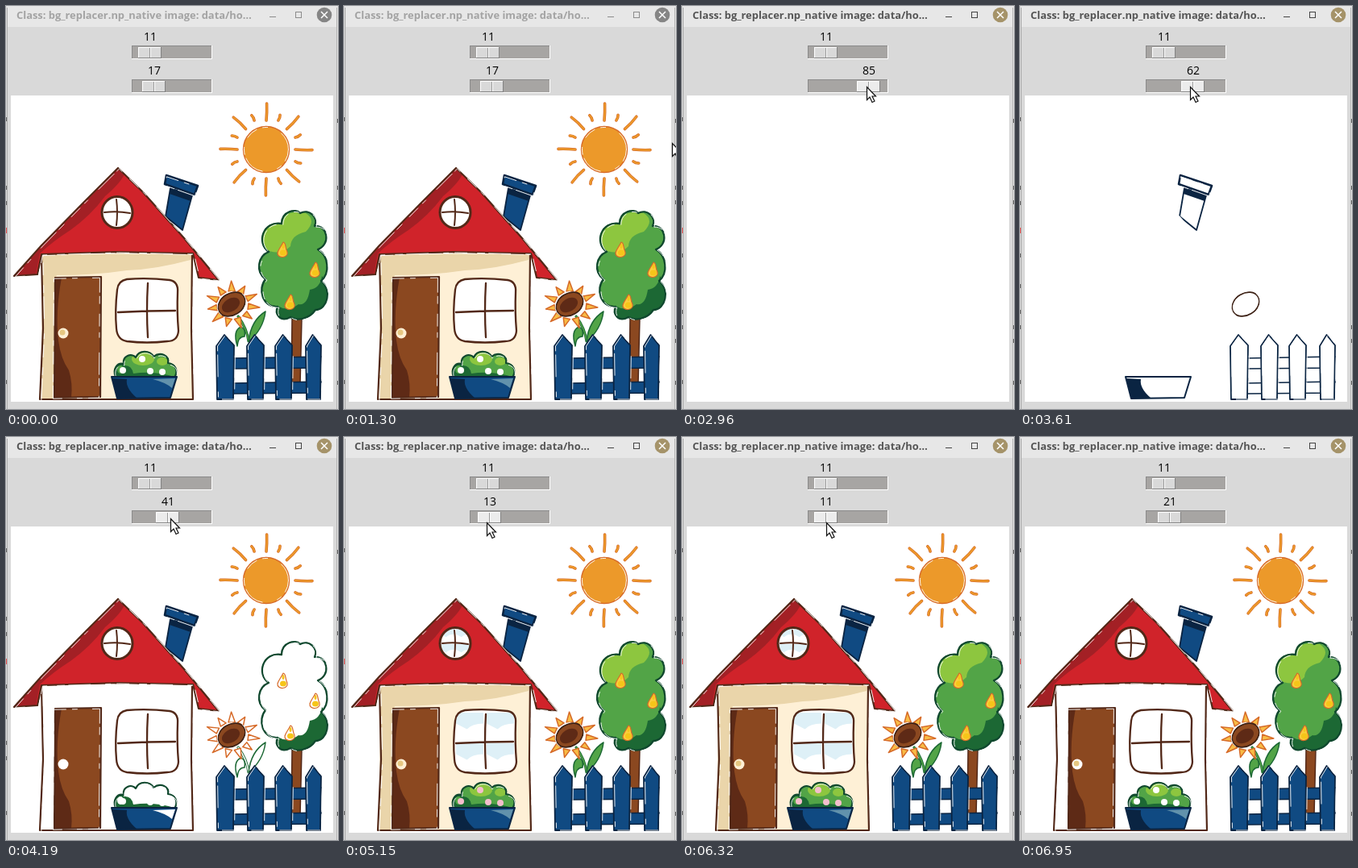
An HTML page with a canvas that plays this animation: 412 px wide and 500 px high, repeating every 7600 ms.

```html
<!DOCTYPE html>
<html lang="en">
<head>
<meta charset="utf-8">
<title>Background replacer</title>
<style>
html, body { margin: 0; width: 100%; height: 100%; overflow: hidden; background: #d9d9d9; }
canvas { display: block; }
</style>
</head>
<body>
<canvas id="stage" width="412" height="500"></canvas>
<script>
const g = document.getElementById('stage').getContext('2d');
const LOOP = 7600;
const SKY = [177, 198, 215];
const C = {
  red: [208, 35, 42], wine: [163, 32, 37], ink: [82, 40, 24], navy: [16, 74, 130], night: [10, 36, 66],
  steel: [98, 146, 172], cream: [254, 240, 214], sand: [234, 213, 170], straw: [230, 200, 130],
  brown: [139, 72, 32], bark: [94, 42, 22], pane: [190, 209, 224], shine: [222, 240, 247],
  lime: [141, 198, 63], green: [82, 164, 71], forest: [28, 104, 52], pine: [16, 72, 46],
  pink: [245, 190, 205], orange: [236, 153, 42], rust: [214, 106, 40], petal: [248, 188, 70],
  pear: [250, 205, 60], gold: [246, 197, 25], seed: [60, 32, 20]
};

// [time, tolerance]
const VALUE = [[2280, 17], [2960, 85], [3160, 85], [3450, 62], [3610, 62], [3870, 50], [4110, 50], [4190, 41],
  [4280, 37], [4470, 37], [5150, 13], [5230, 10], [5270, 10], [5430, 4], [5680, 3], [5770, 4], [5810, 8],
  [5960, 8], [6010, 10], [6280, 10], [6800, 21]];
// [time, x, y]
const POINTER = [[1300, 408, 170], [1560, 18, 150], [1840, 160, 92], [2040, 183, 100], [2280, 183, 100],
  [2960, 229, 100], [3160, 229, 100], [3450, 214, 100], [3870, 207, 101], [4190, 204, 101], [4470, 199, 103],
  [5150, 177, 106], [5430, 174, 106], [5770, 176, 106], [6280, 178, 106], [6800, 186, 106], [6950, 395, 470]];

let tolerance = 17;

function at(keys, t, i = 1) {
  if (t <= keys[0][0]) return keys[0][i];
  const n = keys.findIndex(k => k[0] > t);
  if (n < 0) return keys[keys.length - 1][i];
  const a = keys[n - 1], b = keys[n];
  return a[i] + (b[i] - a[i]) * (t - a[0]) / (b[0] - a[0]);
}

// Colours within the tolerance of the sky turn white.
function css(name) {
  const c = C[name];
  const dist = Math.hypot(...c.map((n, i) => n - SKY[i]));
  return dist < tolerance * 4.3 ? '#fff' : `rgb(${c})`;
}
const shape = d => d instanceof Path2D ? d : new Path2D(d);
function fill(d, color) {
  g.fillStyle = css(color);
  g.fill(shape(d));
}
function stroke(d, color, width = 2) {
  g.strokeStyle = css(color);
  g.lineWidth = width;
  g.stroke(shape(d));
}
function fleck(d, dx = 1.6, dy = 1) {
  g.save();
  g.translate(dx, dy);
  g.setLineDash([15, 8, 6, 19, 27, 5, 9, 13]);
  g.strokeStyle = '#fff';
  g.lineWidth = .9;
  g.stroke(shape(d));
  g.restore();
}
function clipped(d, draw) {
  g.save();
  g.clip(shape(d));
  draw();
  g.restore();
}
function oval(x, y, rx, ry = rx, turn = 0) {
  const p = new Path2D();
  p.ellipse(x, y, rx, ry, turn, 0, 7);
  return p;
}
function box(x, y, w, h, color) {
  g.fillStyle = color;
  g.fillRect(x, y, w, h);
}

const ROOF = 'M10 335L44 297L96 244L139 201L170 231L221 288L264 340L239 337L232 307L138 305L44 308L39 333Z';
const WALL = 'M44 308L138 305L231 307L230 400L232 488L42 488L46 400Z';
const DOOR = 'M61 337L118 336L117 485L60 486Z';
const CASE = 'M150 339Q176 337 203 340Q214 342 213 355Q212 380 214 403Q213 416 200 416Q175 419 150 416Q138 414 137 400Q135 378 138 352Q139 341 150 339Z';
const STACK = 'M204 226L231 235L219 278L198 261Z';
const CAP = 'M199 210L238 223L234 234L197 221Z';
const BUSH = 'M136 460C132 450 138 442 146 444C144 434 156 430 161 436C165 426 179 427 183 435C192 428 203 434 201 443C211 444 214 453 209 461Z';
const POT = 'M131 460L212 460L204 486L138 487Z';
const TREE = 'M342 270C342 254 360 251 365 257C376 251 388 262 383 273C400 272 403 296 387 302C401 310 402 332 391 341C405 352 399 377 384 377C376 389 360 391 353 386C340 393 333 382 337 373C318 374 312 351 322 339C309 329 313 310 326 305C310 294 319 266 342 270Z';
const SEAM = 'M240 114Q200 120 165 129Q130 141 102 161Q65 184 39 198L33 229Q24 255 26 285L14 322M28 361V400L39 425M350 118L373 140L382 171V213L404 247M403 382L389 393M245 419L276 425Q300 424 315 418';
const PICKETS = [[261, 22], [299, 21], [334, 21], [372, 19]];
const picket = (x, w) => `M${x} 422L${x + w / 2 - 1} 408L${x + w} 421L${x + w - 1} 488L${x + 1} 488Z`;

function sky() {
  const open = tolerance < 5.5;
  box(6, 111, 400, 380, open ? `rgb(${SKY})` : '#fff');
  if (!open) return;
  box(283, 414, 16, 22, '#fff');
  box(283, 452, 16, 15, '#fff');
  g.save();
  g.lineCap = 'butt';
  g.strokeStyle = '#fff';
  g.lineWidth = 1;
  g.setLineDash([9, 2, 4, 3]);
  g.stroke(new Path2D(SEAM));
  g.lineWidth = 5;
  g.setLineDash([2, 3, 3, 2, 1, 4]);
  [ROOF, WALL, STACK, CAP, TREE, oval(323, 178, 29), ...PICKETS.map(p => picket(...p)), ...RAYS, ...PETALS]
    .forEach(d => g.stroke(shape(d)));
  g.restore();
}

function ray(i) {
  const a = i * Math.PI / 8, far = i % 2 ? 46 : 57, near = i % 2 ? 39 : 36;
  const p = (r, off) => `${323 + r * Math.cos(a) - off * Math.sin(a)} ${178 + r * Math.sin(a) + off * Math.cos(a)}`;
  return `M${p(near, 0)}Q${p((near + far) / 2, 1)} ${p(far, i % 4 ? -.6 : .6)}`;
}
const RAYS = Array.from({ length: 16 }, (_, i) => ray(i));

function petal(i) {
  const a = i * Math.PI * 2 / 11 + .1, tip = i % 2 ? 31 : 34;
  const p = (r, b) => `${281 + r * Math.cos(a + b)} ${371 + r * .88 * Math.sin(a + b)}`;
  return `M${p(20, -.21)}L${p(tip, 0)}L${p(20, .21)}Z`;
}
const PETALS = Array.from({ length: 11 }, (_, i) => petal(i));

function sun() {
  for (const d of RAYS) {
    stroke(d, 'rust', 3.6);
    stroke(d, 'orange', 2.2);
  }
  const disc = oval(323, 178, 28.5);
  fill(disc, 'orange');
  stroke(disc, 'rust', 1.4);
  fleck(oval(323, 178, 27.5), 0, 0);
}

function glass(d, x, y, s) {
  fill(d, 'pane');
  clipped(d, () => {
    for (const [dx, dy] of [[-19, -19], [19, -19], [-19, 19], [19, 19]]) {
      const cx = x + dx * s, cy = y + dy * s, r = 17 * s;
      fill(`M${cx - r} ${cy - r}H${cx + r}V${cy - r * .2}Q${cx + r * .2} ${cy - r * .2} ${cx - r * .2} ${cy + r * .2}L${cx - r} ${cy - r * .2}Z`, 'shine');
    }
  });
}

function house() {
  fill(STACK, 'navy');
  fill('M203 226L231 235L229 242L203 233Z', 'night');
  stroke(STACK, 'night', 1.8);
  fill(CAP, 'navy');
  stroke(CAP, 'night', 2.6);
  fleck(CAP, .4, 1.8);

  fill(WALL, 'cream');
  fill('M45 308L231 308L229 315Q185 327 150 328Q110 334 63 334Q57 350 60 400L62 487L44 487Z', 'sand');
  stroke(WALL, 'ink', 2.2);
  fleck(WALL, 1.8, 1.5);

  fill(ROOF, 'red');
  fill('M139 202L147 209Q140 222 123 236Q105 260 80 278Q58 292 42 307L37 333L12 334L45 298Z', 'wine');
  stroke(ROOF, 'ink', 2.2);
  fleck(ROOF, 1.5, 1);

  const port = oval(138, 256, 19, 19.5);
  glass(port, 138, 256, .5);
  stroke(port, 'ink', 3);
  stroke('M137 240Q139 256 137 272M122 256Q138 254 154 257', 'ink', 2);

  fill(DOOR, 'brown');
  fill('M61 337L69 337Q61 380 65 415Q68 438 78 452Q83 468 81 486L60 486Z', 'bark');
  stroke(DOOR, 'ink', 2.2);
  fleck(DOOR, -1.6, 1.2);
  fill(oval(71, 406, 6.5), 'cream');
  fill(oval(70, 405, 3.5), 'straw');

  glass(CASE, 175, 378, 1);
  stroke(CASE, 'ink', 2.3);
  stroke('M176 344Q174 378 176 411M139 380Q175 378 210 378', 'ink', 2.3);

  fill(BUSH, 'green');
  clipped(BUSH, () => {
    fill(oval(170, 438, 14, 8), 'lime');
    fill(oval(194, 441, 7, 5), 'lime');
    fill('M133 460V446Q142 440 148 446Q156 446 158 456Q185 452 212 461Z', 'forest');
    fill(oval(142, 451, 4, 5), 'green');
  });
  stroke(BUSH, 'pine', 2.2);
  fleck(BUSH, 1, 2);
  [[169, 438], [145, 452], [179, 453], [194, 454]].forEach(([x, y]) => fill(oval(x, y, 4), 'pink'));
  fill(POT, 'navy');
  fill('M182 463L210 462L206 474Q198 467 182 463Z', 'steel');
  fill('M132 462L150 463Q148 474 162 486L138 486Z', 'night');
  stroke(POT, 'night', 2);
}

function pear(x, y) {
  const d = `M${x + 1} ${y - 9}C${x + 5} ${y - 8} ${x + 3} ${y - 2} ${x + 6} ${y + 3}C${x + 8} ${y + 11} ${x - 7} ${y + 12} ${x - 6} ${y + 4}C${x - 5} ${y} ${x - 2} ${y - 3} ${x + 1} ${y - 9}Z`;
  fill(d, 'pear');
  fill(oval(x + 1, y + 4, 4, 3.6), 'gold');
  fill(oval(x + 1, y - 4, 1.5, 3), 'gold');
  stroke(d, 'rust', 1.2);
}
function tree() {
  fill('M355 382L367 382L365 470L355 470Z', 'brown');
  stroke('M355 388L354 470M367 388L365 470', 'ink', 1.5);
  fill(TREE, 'green');
  clipped(TREE, () => {
    fill('M318 300Q315 268 343 270Q343 252 372 257Q386 266 372 280Q354 284 353 298Q340 312 318 300Z', 'lime');
    fill('M337 372Q350 380 363 370Q374 372 377 352Q390 350 392 335L405 350L398 385L350 394L330 385Z', 'forest');
  });
  stroke(TREE, 'pine', 2.3);
  fleck(TREE, 1.8, 1.2);
  [[343, 302], [383, 327], [352, 367]].forEach(p => pear(...p));
}

function flower() {
  stroke('M288 385Q299 400 301 416', 'forest', 3.2);
  stroke('M288 385Q299 400 301 416', 'green', 1.4);
  for (const leaf of ['M301 416Q304 390 322 379Q319 402 301 416Z', 'M287 422Q281 402 292 398Q298 402 296 410Q288 410 287 422Z']) {
    fill(leaf, 'green');
    stroke(leaf, 'forest', 1.5);
  }
  for (const d of PETALS) {
    fill(d, 'petal');
    stroke(d, 'rust', 1.5);
  }
  const head = oval(280, 370, 18, 13.5, -.55);
  fill(head, 'brown');
  fill(oval(279, 371, 12, 8, -.55), 'bark');
  stroke(head, 'seed', 1.8);
  fleck(oval(280, 370, 19, 15, -.55), 0, 0);
}

function fence() {
  for (const y of [436, 467]) {
    const d = `M281 ${y + 1}L391 ${y - 1}L390 ${y + 13}L281 ${y + 14}Z`;
    fill(d, 'navy');
    stroke(d, 'night', 1.5);
  }
  for (const p of PICKETS) {
    const d = picket(...p);
    fill(d, 'navy');
    stroke(d, 'night', 1.8);
    fleck(d, 1.5, 0);
  }
}

function picture() {
  g.save();
  g.beginPath();
  g.rect(6, 111, 400, 380);
  g.clip();
  g.lineCap = g.lineJoin = 'round';
  sky();
  sun();
  house();
  tree();
  flower();
  fence();
  g.restore();
}

function slider(y, value, hot) {
  const left = Math.floor(157.2 + value * .704);
  g.font = '14px "Open Sans", "Noto Sans", sans-serif';
  g.textAlign = 'center';
  g.fillStyle = '#000';
  g.fillText(value, left + 15, y - 6);
  box(156, y, 100, 17, '#fff');
  box(156, y, 99, 16, '#8a8a8a');
  box(157, y + 1, 98, 15, '#a7a5a3');
  box(left, y + 2, 29, 14, '#828282');
  box(left, y + 2, 28, 13, '#fff');
  box(left + 1, y + 3, 27, 12, hot ? '#ececec' : '#d9d9d9');
  box(left + 14, y + 3, 1, 12, '#999');
  box(left + 15, y + 3, 1, 12, '#fff');
}

function frame(active) {
  box(0, 0, 412, 500, '#d9d9d9');
  box(0, 0, 412, 26, '#e7e7e7');
  box(0, 0, 1, 500, '#e0e0e0');
  box(1, 2, 1, 498, '#aaa');
  box(410, 2, 1, 498, '#b4b4b4');
  box(411, 0, 1, 500, '#e6e6e6');
  [140, 225, 244, 309, 347, 379, 398, 466].forEach(y => box(0, y - 2, 1, 5, '#666'));
  box(0, 275, 1, 7, '#e55');
  [142, 225, 243, 398, 415, 467].forEach(y => box(411, y - 2, 1, 5, '#666'));

  g.font = 'bold 12.9px "Open Sans", "Noto Sans", sans-serif';
  g.textAlign = 'left';
  g.fillStyle = active ? '#555' : '#a3a3a3';
  g.fillText('Class: bg_replacer.np_native image: data/ho…', 13, 16);
  box(327, 13, 8, 1, active ? '#444' : '#8c8c8c');
  g.strokeStyle = active ? '#444' : '#8c8c8c';
  g.lineWidth = 1;
  g.strokeRect(359.5, 7.5, 7, 7);
  g.fillStyle = active ? '#a59369' : '#858585';
  g.fill(oval(395, 11, 9.3));
  g.strokeStyle = '#fff';
  g.lineWidth = 1.5;
  g.stroke(new Path2D('M391 7L399 15M399 7L391 15'));
}

function pointer(x, y) {
  g.save();
  g.translate(Math.round(x), Math.round(y));
  const arrow = new Path2D('M.5 .5V16.5L4 13L7 19.5L10 18L7 12H11.5Z');
  g.fillStyle = '#fff';
  g.fill(arrow);
  g.strokeStyle = '#111';
  g.lineWidth = 1.2;
  g.stroke(arrow);
  g.restore();
}

function draw(t) {
  tolerance = Math.round(at(VALUE, t));
  frame(t >= 2280);
  slider(49, 11, false);
  slider(91, tolerance, t >= 1980 && t < 6830);
  picture();
  if (t >= 1300 && t < 6950) pointer(at(POINTER, t), at(POINTER, t, 2));
}

const start = performance.now();
function tick() {
  draw((performance.now() - start) % LOOP);
  requestAnimationFrame(tick);
}
tick();
</script>
</body>
</html>
```
